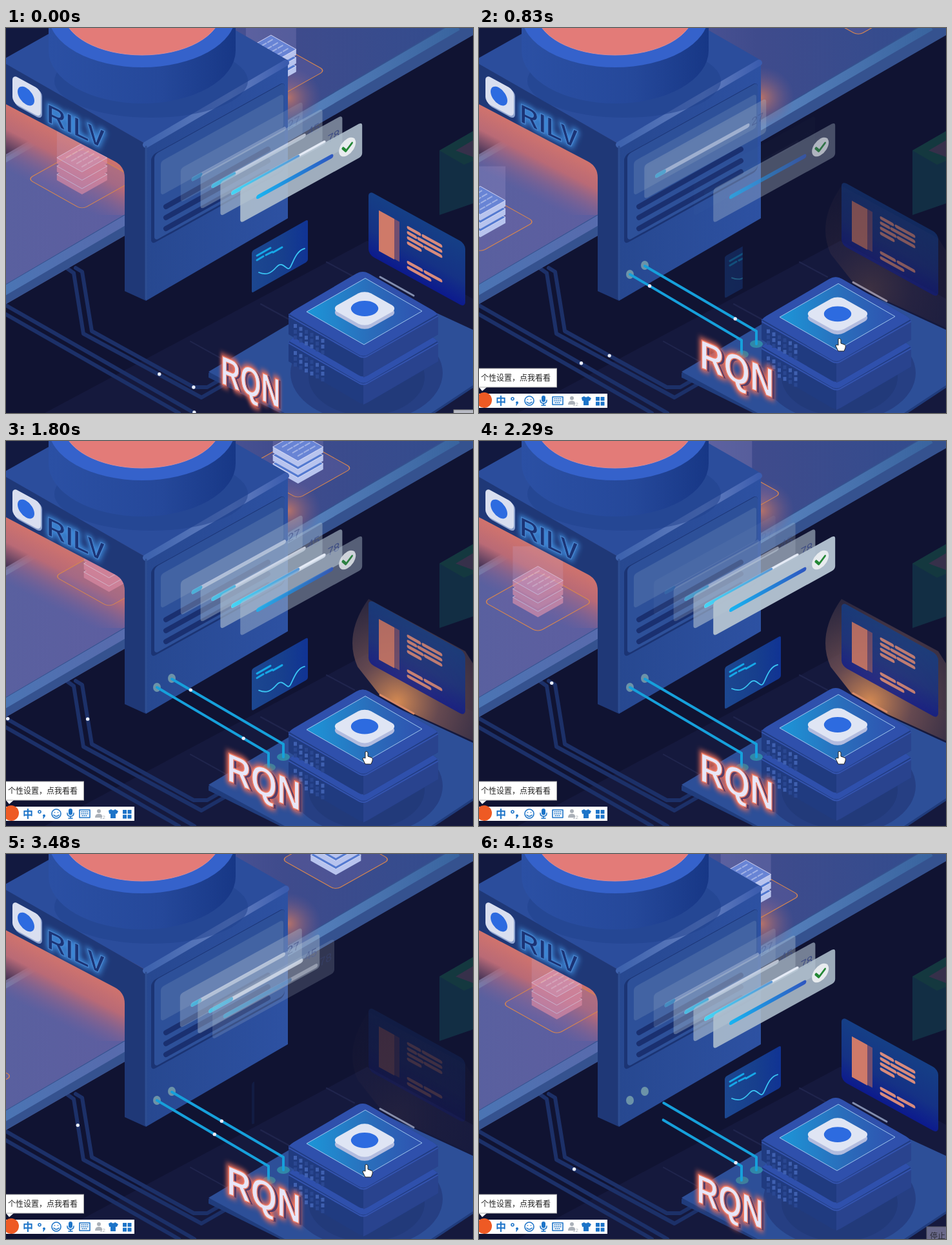
Animation, 724 px wide and 597 px high, one loop 4250 ms. Source, as an HTML page:

```html
<!DOCTYPE html>
<html lang="zh">
<head>
<meta charset="utf-8">
<title>Data centre</title>
<style>
html, body { margin: 0; width: 100%; height: 100%; overflow: hidden; background: #101332; }
svg { display: block; width: 100vw; height: 100vh; }
text { font-family: "Liberation Sans", "Noto Sans CJK SC", "Noto Sans CJK", sans-serif; }
.line { fill: none; stroke-linecap: round; stroke-linejoin: round; }
</style>
</head>
<body>
<svg id="stage" viewBox="0 0 724 597" preserveAspectRatio="none">
<defs>
  <linearGradient id="belt"><stop offset="0" stop-color="#59609f"/><stop offset=".25" stop-color="#5d5ea0"/><stop offset=".6" stop-color="#3f4b8c"/><stop offset="1" stop-color="#314c8e"/></linearGradient>
  <linearGradient id="edge"><stop offset="0" stop-color="#4a75b4"/><stop offset=".25" stop-color="#576bad"/><stop offset=".65" stop-color="#5781bd"/><stop offset="1" stop-color="#39649f"/></linearGradient>
  <linearGradient id="warm" gradientUnits="userSpaceOnUse" x1="105" y1="168" x2="62" y2="252"><stop offset="0" stop-color="#d3746c"/><stop offset=".4" stop-color="#b96a76"/><stop offset="1" stop-color="#7d6097" stop-opacity="0"/></linearGradient>
  <radialGradient id="ember"><stop offset="0" stop-color="#b87268"/><stop offset="1" stop-color="#70588a" stop-opacity="0"/></radialGradient>
  <linearGradient id="drum"><stop offset="0" stop-color="#2b50a4"/><stop offset=".6" stop-color="#25489a"/><stop offset="1" stop-color="#173786"/></linearGradient>
  <linearGradient id="side"><stop offset="0" stop-color="#274890"/><stop offset="1" stop-color="#2d51a2"/></linearGradient>
  <linearGradient id="bevel"><stop offset="0" stop-color="#3d62ad"/><stop offset=".6" stop-color="#6580c0"/><stop offset="1" stop-color="#3b5cae"/></linearGradient>
  <linearGradient id="lid"><stop offset="0" stop-color="#1c96d8"/><stop offset=".55" stop-color="#2a6dbb"/><stop offset="1" stop-color="#2f52b0"/></linearGradient>
  <linearGradient id="chartFill"><stop offset="0" stop-color="#1c4790"/><stop offset=".55" stop-color="#173f8d"/><stop offset="1" stop-color="#103394"/></linearGradient>
  <linearGradient id="panelFill" x2="0" y2="1"><stop offset="0" stop-color="#153f86"/><stop offset=".6" stop-color="#153285"/><stop offset="1" stop-color="#0c1a8e"/></linearGradient>
  <linearGradient id="progress" gradientUnits="userSpaceOnUse" x1="20" x2="150"><stop offset="0" stop-color="#17b9f4"/><stop offset="1" stop-color="#2f51bd"/></linearGradient>
  <linearGradient id="part" gradientUnits="userSpaceOnUse" x1="20" x2="140"><stop offset="0" stop-color="#43d4f5"/><stop offset="1" stop-color="#5f8cd0"/></linearGradient>
  <radialGradient id="coneFill" gradientUnits="userSpaceOnUse" cx="606" cy="405" r="165"><stop offset="0" stop-color="#d58a52"/><stop offset=".4" stop-color="#7a5555" stop-opacity=".8"/><stop offset="1" stop-color="#403648" stop-opacity=".55"/></radialGradient>
  <filter id="soft" x="-50%" y="-50%" width="200%" height="200%"><feGaussianBlur stdDeviation="4"/></filter>
  <clipPath id="wipe"><rect id="wipeRect" x="375" y="270" height="180"/></clipPath>
</defs>

<rect width="724" height="597" fill="#101332"/>
<path d="M60 597 560 330 724 420V597Z" fill="#191d45" opacity=".6"/>
<path class="line" d="M286 486 360 527M395 428 450 458M497 363 540 386" stroke="#20254d" stroke-width="2"/>
<path d="M672 190 724 160V272L672 290Z" fill="#122e44"/>
<path d="M672 190 724 160V206L710 212Z" fill="#14383f"/><path d="M697 190 724 174V200Z" fill="#36304a"/>
<g class="line" stroke="#1c3068" stroke-width="6">
  <path d="M95 373 105 380 120 474 303 573 350 546"/><path d="M108 372 118 378 133 470 291 557 312 557 345 538"/>
  <path d="M0 430 292 597M0 444 268 597"/>
</g>

<path d="M-10 206 345 0H724V11L0 428V210Z" fill="url(#belt)"/>
<path d="M0 397 686 -5H724V11L0 428Z" fill="#35528f"/>
<path d="M-10 412 700 -3" stroke="url(#edge)" stroke-width="14"/>
<path d="M-10 208 150 115" stroke="#7189b6" stroke-width="11" opacity=".8"/>
<path d="M-10 100 190 210V290L120 290-10 225Z" fill="url(#warm)"/>
<ellipse cx="437" cy="108" rx="52" ry="48" fill="url(#ember)"/>
<g id="cargo"></g>

<path d="M-10 52 68 8V-20H-10Z" fill="#121940"/>
<path d="M-10 52 68 8V-20H315L437 50 217 180Z" fill="#2b4d9c"/>
<path d="M217 180 437 50V295L217 423Z" fill="url(#side)"/>
<path d="M-10 50 217 180V423L184 408V232Q184 215 169 207L-10 113Z" fill="#1f3877"/>
<path class="line" d="M217 181 434 54" stroke="url(#bevel)" stroke-width="10"/>
<path class="line" d="M217 184V420" stroke="#2d4d92" stroke-width="3"/>
<ellipse cx="225" cy="82" rx="150" ry="57" fill="#21428f" opacity=".55"/>
<path d="M66 -20V35A145 82 0 0 0 356 35V-20Z" fill="url(#drum)"/>
<ellipse cx="211" cy="-20" rx="145" ry="81" fill="#3562cb"/>
<ellipse cx="211" cy="-25" rx="122" ry="67" fill="#e37b78" stroke="#d18b9e"/>
<g transform="matrix(1 -.555 0 1 225 198)">
  <rect width="207" height="138" rx="7" fill="#1b3474"/><rect x="5" y="1" width="202" height="134" rx="6" fill="#2d5099"/>
</g>
<path class="line" d="M248 277 406 188M248 294 406 206M248 311 406 223" stroke="#1a3070" stroke-width="8"/>

<g transform="matrix(1 .55 0 1 10 72)"><rect x="2" y="1" width="44" height="44" rx="8" fill="#8fa3cf"/><rect width="44" height="43" rx="8" fill="#d9dff0"/><circle cx="21" cy="22" r="13" fill="#2d6be0"/></g>
<g transform="matrix(1 .48 0 1 63 145)" font-size="41" font-weight="bold">
  <text fill="none" stroke="#3f8fe0" stroke-width="5" filter="url(#soft)">RILV</text>
  <text fill="#1b3476" stroke="#4a86cf" stroke-width="1.2">RILV</text>
</g>
<g id="cards"><g transform="matrix(1 -.555 0 1 240 207)"><rect width="190" height="53" rx="5" fill="#8ea3c2" opacity=".22"/></g></g>

<g id="chart" clip-path="url(#wipe)"><g id="chartBody">
  <rect width="87" height="65" rx="3" fill="url(#chartFill)" transform="matrix(1 -.565 0 1 381 346)"/>
  <g class="line" stroke="#16a8e8" stroke-width="3"><path d="M389 353 410 341M414 348 428 340M389 360 399 354M403 352 413 347"/></g>
  <path class="line" d="M392 379C404 384 411 380 419 371S431 370 437 373 446 346 463 342" stroke="#3ac5f3" stroke-width="1.8"/>
</g></g>

<path d="M314 535 555 398 724 480V558L665 597H425L314 542Z" fill="#203c7c"/>
<path d="M314 533 555 390 724 468V554L659 597H432Z" fill="#2d4f98"/>
<ellipse cx="559" cy="535" rx="118" ry="76" fill="#263f83"/><ellipse cx="559" cy="541" rx="90" ry="60" fill="#223a7a"/>

<path id="cone" fill="url(#coneFill)" d="M578 392 545 350Q523 300 562 245L712 326 724 345V465L634 424Z"/>
<g id="panel">
  <rect width="150" height="99" rx="8" fill="url(#panelFill)"/>
  <rect x="24" y="22" width="24" height="62" fill="#714e70"/><rect x="16" y="22" width="24" height="63" fill="#cf7a69"/>
  <path class="line" d="M62 24H79M85 24H112M62 32H73M78 32H112M62 40H83M88 40H112M62 48H80M62 78H82M88 78H112M62 86H95" stroke="#d98b7c" stroke-width="5"/>
</g>

<g id="server">
  <path class="line" id="slot" d="M580 386 632 415" stroke-width="3"/>
  <g id="units"></g>
  <path d="M557 388 466 440 555 491 645 439Z" fill="url(#lid)" stroke="#9dc5ed"/>
  <g transform="matrix(1 .56 -1 .56 556 441)"><rect x="-26" y="-26" width="52" height="52" rx="10" fill="#b2bcdf"/></g>
  <g transform="matrix(1 .56 -1 .56 556 435)"><rect x="-26" y="-26" width="52" height="52" rx="10" fill="#dfe5f4"/><circle r="15" fill="#2d6be0"/></g>
</g>

<g id="sockets"><ellipse cx="234" cy="382" rx="6" ry="7" fill="#6c93a8"/><ellipse cx="257" cy="368" rx="6" ry="7" fill="#6c93a8"/><ellipse cx="430" cy="490" rx="10" ry="6" fill="#3188a8"/><ellipse cx="408" cy="506" rx="10" ry="6" fill="#3e7f9c"/></g>
<g id="cables" class="line" stroke="#16a0db" stroke-width="4"><path pathLength="1" d="M430 490V470L257 369"/><path pathLength="1" d="M407 506V484L234 382"/></g>
<g id="dots" fill="#e8edfb"></g>

<g id="sign" font-size="63" font-weight="bold">
  <text fill="#ee6e58" stroke="#ee6e58" stroke-width="8" filter="url(#soft)">RQN</text>
  <text x="5" y="1" fill="#563c66">RQN</text>
  <text fill="#e8e6f7" stroke="#ef8069" stroke-width="1.6">RQN</text>
</g>

<g id="ime">
  <path d="M0 557 5 563 12 557Z" fill="#fff"/><rect x="-1" y="528" width="121.5" height="29" fill="#fff" stroke="#aaa"/>
  <text x="3" y="547" font-size="12" fill="#222">个性设置，点我看看</text>
  <rect y="567" width="199" height="22" fill="#fff"/>
  <circle cx="8" cy="577" r="12" fill="#ee5a24"/>
  <g fill="#1d74c8"><text x="26" y="584" font-size="16" font-weight="bold">中</text>
    <path d="M159 573 163 571Q166 574 169 571L174 574 172 578H170V585H162V578H160Z"/>
    <path d="M181 572h6v6h-6zM188.500 572h6v6h-6zM181 579.500h6v6h-6zM188.500 579.500h6v6h-6z"/>
    <rect x="97" y="570" width="6" height="10" rx="3"/><circle cx="59" cy="581" r="2"/><path d="M61 581 58 586 57 584Z"/></g>
  <g class="line" stroke="#1d74c8" stroke-width="1.6"><circle cx="52" cy="575" r="2"/><circle cx="78" cy="578" r="7"/><path d="M74 580Q78 584 82 580M75.500 576v.1M80.500 576v.1M95 577Q95 582 100 582T105 577M100 582V585M97 585H103"/><rect x="114" y="572" width="16" height="12"/><path stroke-dasharray="1 2" d="M117 575H128M117 578H128M118 581H126"/></g>
  <g fill="#aab0b8"><circle cx="144" cy="574" r="3"/><path d="M138 584Q138 578 144 578T149 584Z"/><text x="145" y="586" font-size="8">12</text></g>
</g>
<path id="hand" d="M557 482Q559 480 561 483V489L567 491Q569 492 568 496L566 501H557L553 493Q553 490 557 492Z" fill="#fff" stroke="#222"/>
<g id="tip"><rect width="32" height="22" stroke="#777"/><text x="5" y="19" font-size="12" fill="#333">停止</text></g>
</svg>
<script>
const LOOP = 4250, FLOW = 2100, REVEAL = 2700;
const $ = id => document.getElementById(id);
const set = (el, attrs) => { for (const k in attrs) el.setAttribute(k, attrs[k]); };
const mix = (a, b, u) => a + (b - a) * u;
const linear = (t, a, b) => Math.max(0, Math.min(1, (t - a) / (b - a)));
const smooth = (t, a, b) => { const s = linear(t, a, b); return s * s * (3 - 2 * s); };
const easeOut = s => 1 - (1 - s) ** 2;
// Rises from a to b, falls from c to d.
const pulse = (t, a, b, c, d) => smooth(t, a, b) * (1 - smooth(t, c, d));

function serverUnit(y) {
  const outline = h => `M438 ${y + 4}Q438 ${y} 446 ${y - 5}L543 ${y - 62}Q553 ${y - 68} 563 ${y - 62}L662 ${y - 5}Q670 ${y} 670 ${y + 4}V${y + h}L562 ${y + h + 63}Q554 ${y + h + 68} 546 ${y + h + 63}L438 ${y + h}Z`;
  let leds = '';
  for (let c = 0; c < 6; c++) for (let r = 0; r < 3; r++)
    leds += `<rect x="${446 + c * 8.5}" y="${y + 16 + c * 4.6 + r * 9}" width="5" height="6" fill="${(c * 5 + r * 3) % 4 < 2 ? '#3f60b0' : '#2a4791'}"/>`;
  return `<path d="${outline(32)}" fill="#203b80"/>
    <path d="M554 ${y + 68}V${y + 99}L562 ${y + 95} 670 ${y + 32}V${y + 3}Z" fill="#29438e"/>
    <path d="${outline(0)}" fill="#2f50ac"/>
    <path class="line" d="M439 ${y + 4} 548 ${y + 66}Q554 ${y + 69} 560 ${y + 66}L669 ${y + 4}" stroke="#3454af" stroke-width="2"/>${leds}`;
}
$('units').innerHTML = serverUnit(485) + serverUnit(443);

function cargoItem() {
  const plate = (y, kind) => `<g transform="translate(0 ${y})"><path class="slab" d="M-39 0 0 22 39 0V9L0 31-39 9Z"/><path class="${kind}" d="M-39 0 0-22 39 0 0 22Z" stroke="#eef" stroke-width=".8"/></g>`;
  return `<g><g transform="matrix(1 .56 -1 .56 0 0)"><rect x="-42" y="-42" width="84" height="84" rx="7" fill="#7568a5" fill-opacity=".3" stroke="#d6864f" stroke-width="1.1"/></g>
    <g class="stack">${plate(-7, 'face')}${plate(-20, 'face')}${plate(-33, 'face')}
    <path class="line" d="M-24-33 2-48M-16-28 10-43M-8-24 18-39M0-19 26-34" stroke="#fff" stroke-width="2" stroke-dasharray="8 3" opacity=".4"/></g>
    <path d="M-39-86H39V-33L0-11-39-33Z" fill="#cbb9e8" opacity=".16"/></g>`;
}
$('cargo').innerHTML = cargoItem().repeat(3);
const cargo = [...$('cargo').children];

function cardItem(percent) {
  const bar = (x, X, stroke) => `<path class="line" d="M${x} 27H${X}" stroke="${stroke}" stroke-width="6.500"/>`;
  const content = percent < 100
    ? bar(20, 160, '#e4eaf5') + bar(20, 20 + 1.4 * (percent - 5) * percent / 80, 'url(#part)') + `<text x="166" y="31" font-size="17" fill="#3c4b83">${percent}</text>`
    : bar(28, 141, 'url(#progress)') + '<circle cx="166" cy="26" r="13" fill="#e8ecef"/><path class="line" d="M159 24 164 31 173 24" stroke="#238735" stroke-width="3.500"/>';
  return `<g><rect width="189" height="53" rx="5" fill="#b2c2d0"/><g>${content}</g></g>`;
}
$('cards').insertAdjacentHTML('beforeend', [27, 45, 78, 100].map(cardItem).join(''));
const cards = [...$('cards').children].slice(1);

// Ground tracks and cables that carry the light dots.
const makePath = d => {
  const path = document.createElementNS('http://www.w3.org/2000/svg', 'path');
  path.setAttribute('d', d);
  return path;
};
const inner = makePath('M291 557 133 470 118 378 108 373');
const outer = makePath('M95 373 105 382 120 474 302 571');
const lower = makePath('M292 596 0 429');
const upCable = makePath('M430 470 257 369'), downCable = makePath('M234 382 407 484');
$('dots').innerHTML = '<circle r="2.7"/>'.repeat(6);
const dots = [...$('dots').children];

function placeDot(dot, path, distance) {
  const inside = distance > 0 && distance < path.getTotalLength();
  const { x, y } = path.getPointAtLength(distance);
  set(dot, { cx: x, cy: y, opacity: inside ? 1 : 0 });
}

function moveCargo(p) {
  cargo.forEach((el, i) => {
    const steps = 1 - i - p / FLOW;
    const x = 411 + 293 * steps, y = 66 - 168 * steps;
    const warmth = x > 250 ? 0 : linear(x, 10, 100);
    const tint = (r, g, b) => `rgb(${mix(r, 222, warmth)},${mix(g, 140, warmth)},${mix(b, 165, warmth)})`;
    el.setAttribute('transform', `translate(${x} ${y})`);
    el.querySelector('.stack').setAttribute('opacity', 1 - .35 * warmth);
    el.querySelectorAll('.slab').forEach(s => s.setAttribute('fill', tint(184, 196, 238)));
    el.querySelectorAll('.face').forEach(s => s.setAttribute('fill', tint(84, 122, 208)));
  });
}

// Cards slide out of the machine one after another.
function moveCards(p) {
  cards.forEach((el, i) => {
    const appear = 500 + 300 * i, leave = 1700 + 250 * i, start = 490 + 160 * i;
    const q = p < appear ? p + FLOW : p;
    const move = (i + 1) * easeOut(linear(q, start, start + 1090 - 95 * i));
    const alpha = (.34 + .07 * i * i) * pulse(q, appear, appear + 500 + 120 * i, leave, leave + 800);
    set(el, { transform: `matrix(1 -.55 0 1 ${240 + 30.8 * move} ${207 + 10.7 * move})` });
    el.firstChild.setAttribute('opacity', alpha);
    el.lastChild.setAttribute('opacity', Math.min(1, alpha * 1.9));
  });
}

function update(t) {
  const p = t % FLOW;
  const age = (t - 600 + REVEAL) % REVEAL;
  const hover = pulse(t, 0, 500, 3900, 4150);
  moveCargo(p);
  moveCards(p);

  const bob = 9 * pulse(t, 0, 1000, 3500, 4200) - 4 * pulse(t, 1500, 2250, 2300, 2900);
  $('server').setAttribute('transform', `translate(0 ${bob})`);
  $('chartBody').setAttribute('transform', `translate(0 ${bob})`);
  $('wipeRect').setAttribute('width', 95 * linear(age, 160, 360));
  $('chart').setAttribute('opacity', pulse(age, 100, 400, 2150, 2660));

  const rise = mix(252, 235 + .0085 * age, hover);
  set($('panel'), { transform: `matrix(1 .55 0 1 562 ${rise})`, opacity: (1 - .2 * hover) * pulse(age, 120, 300, 2150, 2660) });
  const glow = hover * pulse(age, 120, 500, 2150, 2660);
  $('cone').setAttribute('opacity', glow);
  $('slot').setAttribute('stroke', `rgb(${130 + 85 * glow},${142 - 5 * glow},${175 - 75 * glow})`);

  const turn = pulse(t, 0, 500, 3950, 4400), width = .66 + .165 * turn;
  $('sign').setAttribute('transform', `matrix(${width} ${width * .42} 0 1 ${333 + 9 * turn} ${551 - 25 * turn})`);

  const drawn = pulse(t, 150, 560, 4010, 4700);
  [...$('cables').children].forEach((cable, i) => {
    const part = drawn - i * .115 * linear(drawn, 1, .86);
    set(cable, { 'stroke-dasharray': `${Math.max(0, part)} 2`, opacity: part > 0 ? 1 : 0 });
  });
  $('sockets').setAttribute('opacity', smooth(t, 100, 350));

  const paths = [inner, outer, outer, lower, upCable, downCable];
  const distances = [.122 * t, .122 * (t - 3050), 240 + .122 * t, .185 * t, .1325 * (p - 545), .124 * (p - 545)];
  dots.forEach((dot, i) => placeDot(dot, paths[i], distances[i]));

  const fresh = t < 70;
  $('ime').setAttribute('opacity', fresh ? 0 : 1);
  $('hand').setAttribute('opacity', t > 350 && t < 4000 ? 1 : 0);
  set($('tip'), { transform: `translate(694 ${fresh ? 592 : 578})`, fill: fresh ? '#b8bac4' : '#8d8cab', opacity: fresh ? 1 : t > 4090 ? .7 : 0 });
}

const begin = performance.now();
function frame() {
  update((performance.now() - begin) % LOOP);
  requestAnimationFrame(frame);
}
update(0);
frame();
</script>
</body>
</html>
```
